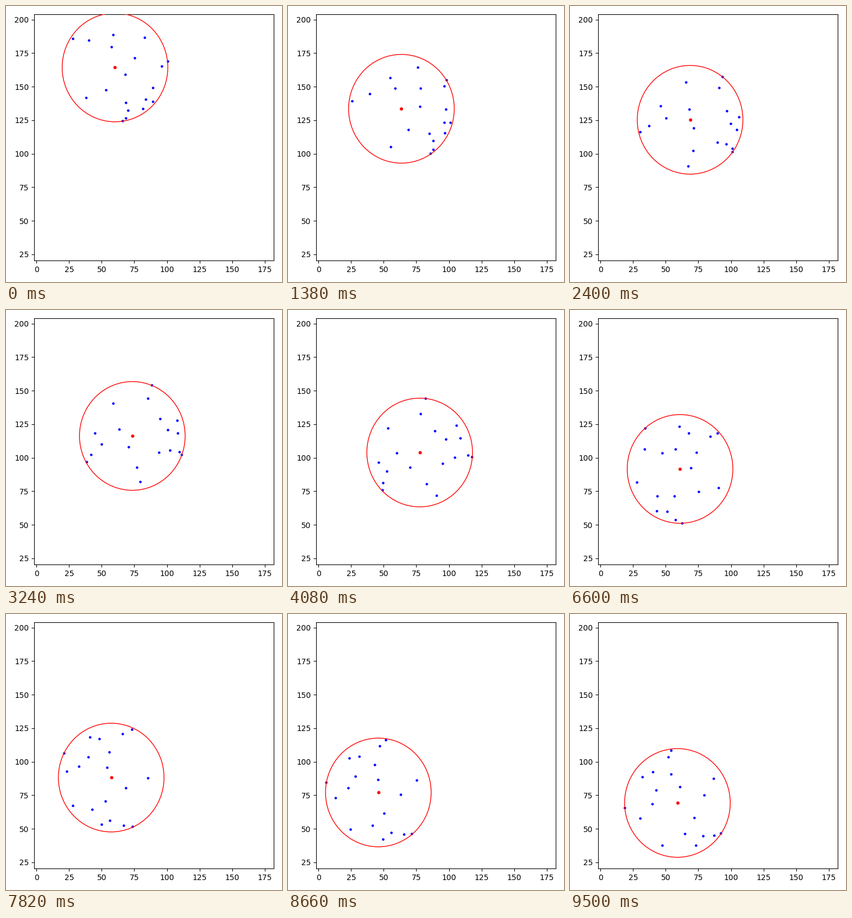
Animation of 500x500 px, one loop 9.6 s. Source, as a matplotlib script:

```python
import numpy as np
import matplotlib.pyplot as plt
from matplotlib.animation import FuncAnimation
from matplotlib.patches import Circle

TICK_MS = 20
TICKS = 480
LAST = 203          # last motion step
RADIUS = 40.5
SPIN = 0.0154       # radians per step, counter-clockwise

# Ring path: step, x, y
PATH = np.array([
    (0, 60.2, 164.3), (21, 64.5, 144.4), (29, 63.6, 133.5),
    (42, 71.7, 127.1), (52, 68.7, 125.3), (84, 77.2, 109.2),
    (88, 77.6, 103.9), (105, 62.8, 105.1), (116, 64.9, 98.9),
    (144, 60.7, 91.1), (167, 57.3, 88.2), (185, 45.9, 77.1),
    (203, 59.0, 69.3)])

# Drift of the dots inside the ring: first step, velocity
DRIFT = [(0, 0.2 + 0.07j), (29, -0.55 - 0.5j), (52, -0.43 - 0.1j),
         (88, -0.25 - 0.38j), (116, -0.4 + 0.22j), (167, 0.3 + 0.15j)]

# Dots at the start of the loop
START = np.array([
    (27.8, 185.8), (40, 184.5), (58.7, 188.5), (57.3, 179.5), (82.8, 186.5),
    (75.2, 171.3), (100.5, 168.9), (95.9, 165.2), (68, 159), (53.1, 147.5),
    (38, 142), (89.1, 149.1), (68.4, 138), (83.6, 140.5), (89, 138.8),
    (70, 132.3), (81.5, 133.5), (68.4, 126.5), (65.8, 124.5)])


def center(step):
    t, x, y = PATH.T
    return np.interp(step, t, x) + 1j * np.interp(step, t, y)


def swirl():
    """Dot offsets from the ring centre; the drift fades out at the rim."""
    z = START @ (1, 1j) - center(0)
    track = [z]
    for step in range(LAST):
        wind = [v for first, v in DRIFT if first <= step][-1]
        z = z * np.exp(1j * SPIN) + wind * (1 - np.abs(z / RADIUS) ** 2)
        track.append(z)
    return track


def step_at(tick):
    """Three steps every seven ticks, held for 1, 5 and 1 ticks."""
    group, rest = divmod(tick, 7)
    return min(3 * group + (rest > 0) + (rest == 6), LAST)


track = swirl()

fig, ax = plt.subplots(figsize=(5, 5), dpi=100)
ax.set_xlim(-1.73, 181.88)
ax.set_ylim(20.35, 203.91)
ax.set_xticks(range(0, 176, 25))
ax.set_yticks(range(25, 201, 25))
fig.tight_layout()

dots, = ax.plot([], [], "o", color="blue", ms=2.25)
hub, = ax.plot([], [], "o", color="red", ms=3.25)
ring = ax.add_patch(Circle((0, 0), RADIUS, fill=False, ec="red", lw=1, zorder=3))


def draw(tick):
    step = step_at(tick)
    c = center(step)
    z = c + track[step]
    dots.set_data(z.real, z.imag)
    hub.set_data([c.real], [c.imag])
    ring.center = (c.real, c.imag)
    return dots, hub, ring


anim = FuncAnimation(fig, draw, frames=TICKS, interval=TICK_MS,
                     init_func=lambda: draw(0), repeat=True, repeat_delay=0)
plt.show()
```
